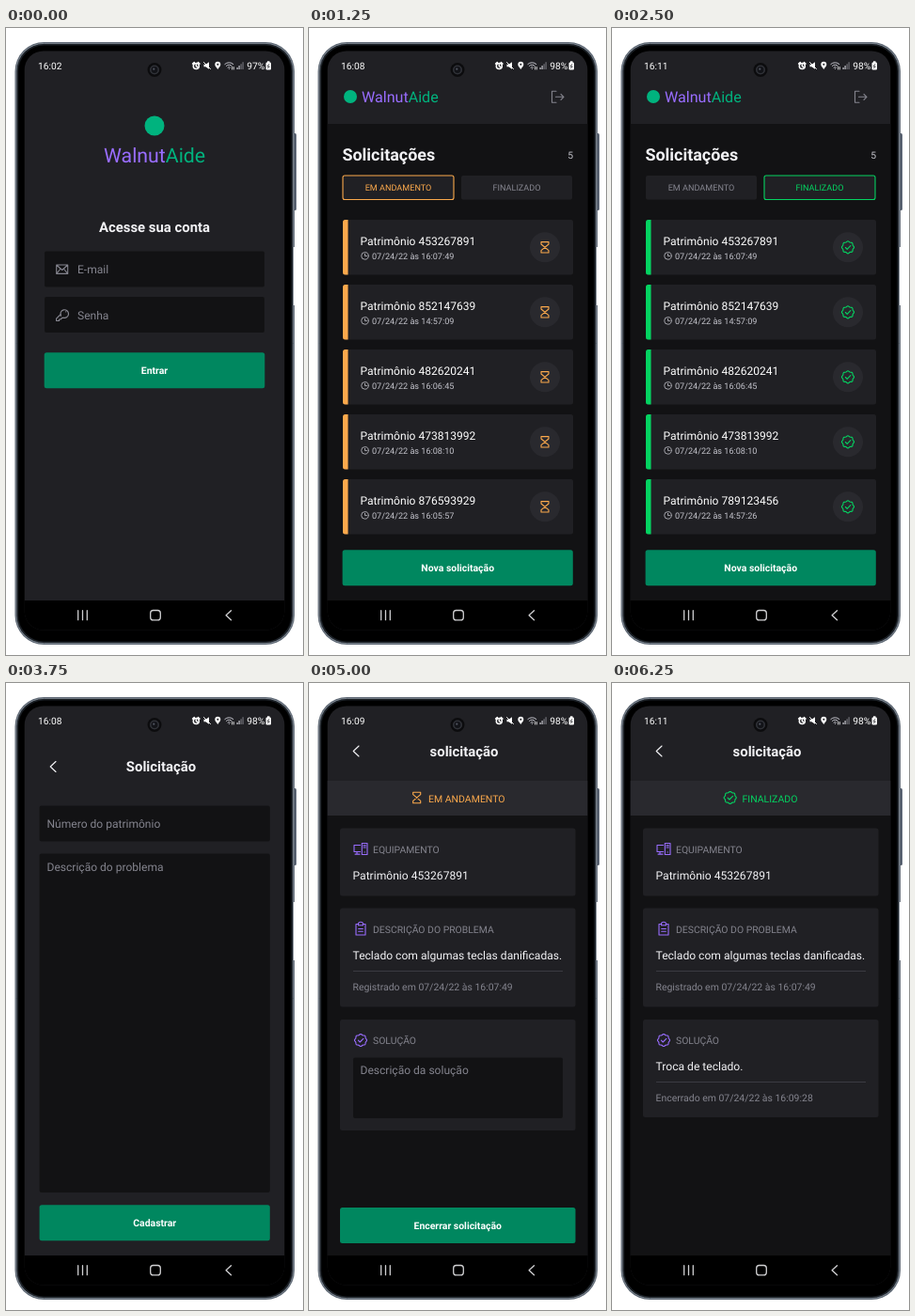
Animation of 316 by 667 pixels, one loop 7.5 s. Source, as an HTML page with a canvas:

```html
<!DOCTYPE html>
<html lang="pt-BR">
<head>
<meta charset="utf-8">
<title>Help desk app</title>
<style>
html, body { margin: 0; width: 100%; height: 100%; overflow: hidden; background: #fff; }
canvas { display: block; width: 316px; height: 667px; }
</style>
</head>
<body>
<canvas id="stage"></canvas>
<script>
const W = 316, H = 667, HOLD = 1250;
const C = {
  dark: '#121214', panel: '#202024', raised: '#29292e', line: '#45454c',
  muted: '#84848e', soft: '#c4c4cc', text: '#f2f2f5', white: '#fff',
  button: '#00875f', teal: '#00b37e', green: '#04d361', orange: '#fba94c', purple: '#996dff'
};
const canvas = document.getElementById('stage');
const ctx = canvas.getContext('2d');
const dpr = window.devicePixelRatio || 1;
canvas.width = W * dpr;
canvas.height = H * dpr;
ctx.textRendering = 'geometricPrecision';

function box(x, y, w, h, fill, r = 0, stroke, lw = 1) {
  ctx.beginPath();
  ctx.roundRect(x, y, w, h, r);
  if (fill) { ctx.fillStyle = fill; ctx.fill(); }
  if (stroke) { ctx.strokeStyle = stroke; ctx.lineWidth = lw; ctx.stroke(); }
}

function dot(x, y, r, fill) {
  ctx.beginPath();
  ctx.arc(x, y, r, 0, Math.PI * 2);
  ctx.fillStyle = fill;
  ctx.fill();
}

function text(str, x, y, size, color = C.white, weight = 400, align = 'left') {
  ctx.font = `${weight} ${size}px Roboto, sans-serif`;
  ctx.textAlign = align;
  ctx.fillStyle = color;
  ctx.fillText(str, x, y);
  return ctx.measureText(str).width;
}

function icon(path, x, y, color, lw = 1, filled = false) {
  ctx.save();
  ctx.translate(x, y);
  ctx.lineWidth = lw;
  ctx.lineCap = ctx.lineJoin = 'round';
  ctx.strokeStyle = ctx.fillStyle = color;
  const p = new Path2D(path);
  if (filled) ctx.fill(p); else ctx.stroke(p);
  ctx.restore();
}

function wavyRing(r) {
  let d = '';
  for (let i = 0; i < 64; i++) {
    const a = i / 64 * Math.PI * 2, k = r + 0.45 * Math.cos(a * 8);
    d += (i ? 'L' : 'M') + (k * Math.cos(a)).toFixed(2) + ' ' + (k * Math.sin(a)).toFixed(2);
  }
  return d + 'Z';
}

const ICON = {
  hourglass: 'M-4-5.7H4V-3.3L-4 3.3V5.7H4V3.3L-4-3.3Z',
  badge: wavyRing(6.1) + 'M-2.6 .2L-.8 2L2.8-1.6',
  back: 'M3-5.5L-2.8 0L3 5.5',
  logout: 'M-1.5-6H-6V6H-1.5M-2 0H6.5M3.5-3L6.5 0L3.5 3',
  mail: 'M-6-4.7H6V4.7H-6ZM-6-4.7L0 .8L6-4.7M-6 4.7L-1.6-.7M6 4.7L1.6-.7',
  key: 'M-1.5 1.2A4.3 4.3 0 1 1 1 3.2L-.6 3.6L-2 5H-3.5V6.5H-6.4V4.2L-1.7-.5M3.6-3.2h.1',
  clock: 'M3.8 0A3.8 3.8 0 1 1-3.8 0A3.8 3.8 0 1 1 3.8 0M0-2.1V.2H2',
  desktop: 'M-.5-4H-7V3H-.5M-4 3V5.6M-6 5.6H-1M1.3-6H7V6H1.3ZM3-3.6H5.3M3-1.5H5.3M4.1 3.4h.1',
  clipboard: 'M-2.3-5H-5V6.5H5V-5H2.3M-2.5-3.8V-5.2A2.5 2 0 0 1 2.5-5.2V-3.8ZM-2.3 0H2.3M-2.3 2.8H2.3'
};

function brand(x, y, size) {
  const w = text('Walnut', x, y, size, C.purple);
  text('Aide', x + w, y, size, C.teal);
}

function button(label, x, y, w) {
  box(x, y, w, 38, C.button, 2.5);
  text(label, x + w / 2, y + 22.8, 10.45, C.white, 700, 'center');
}

function field(label, x, y, w, h, textX, base) {
  box(x, y, w, h, C.dark, 2);
  text(label, textX, base, 12.05, C.muted);
}

function loginScreen() {
  dot(158, 104, 10.5, C.teal);
  brand(104, 143, 21.3);
  text('Acesse sua conta', 158, 217, 14.9, C.text, 700, 'center');
  field('E-mail', 41, 237.5, 234, 38, 76, 261);
  field('Senha', 41, 286, 234, 38, 76, 309.7);
  icon(ICON.mail, 59.7, 256.7, C.muted, 1.1);
  icon(ICON.key, 60, 305, C.muted, 1.2);
  button('Entrar', 40.7, 345.3, 234.6);
}

function tab(label, x, color, active) {
  box(x + .5, 157, 118, 25.5, C.panel, 2, active ? color : null, 1.1);
  text(label, x + 59.5, 173.2, 9.1, active ? color : C.muted, 400, 'center');
}

function orderCard(y, id, time, color, mark) {
  ctx.save();
  ctx.beginPath();
  ctx.roundRect(36, y, 245, 58.5, 2.5);
  ctx.clip();
  box(36, y, 245, 59, C.panel);
  box(36, y, 5.5, 59, color);
  ctx.restore();
  text('Patrimônio ' + id, 54.5, y + 27.2, 12.05);
  icon(ICON.clock, 59.5, y + 38.4, C.soft, .8);
  text('07/24/22 às ' + time, 67, y + 42, 9.1, C.soft);
  dot(251, y + 29.3, 16, C.raised);
  icon(mark, 251, y + 29.3, color, 1.1);
}

function listScreen(done) {
  const color = done ? C.green : C.orange;
  box(18, 102, 280, 507, C.dark);
  dot(44, 73, 7, C.teal);
  brand(56, 78.5, 16.1);
  icon(ICON.logout, 264.5, 73.3, C.muted, 1.1);
  text('Solicitações', 35.5, 141, 17.9, C.text, 700);
  text('5', 281, 139, 10.4, C.soft, 400, 'right');
  tab('EM ANDAMENTO', 35.5, C.orange, !done);
  tab('FINALIZADO', 161.5, C.green, done);
  const last = done ? ['789123456', '14:57:26'] : ['876593929', '16:05:57'];
  const orders = [
    ['453267891', '16:07:49'], ['852147639', '14:57:09'],
    ['482620241', '16:06:45'], ['473813992', '16:08:10'], last
  ];
  orders.forEach(([id, time], i) =>
    orderCard(204 + i * 69, id, time, color, done ? ICON.badge : ICON.hourglass));
  button('Nova solicitação', 35.6, 555.3, 245.2);
}

function formScreen() {
  icon(ICON.back, 50, 89, C.text, 1.1);
  text('Solicitação', 165, 94, 14.9, C.text, 700, 'center');
  field('Número do patrimônio', 35.6, 130.5, 245.2, 38, 43.5, 154.3);
  field('Descrição do problema', 35.6, 181.5, 245.2, 360.5, 43.5, 200);
  button('Cadastrar', 35.6, 555.3, 245.2);
}

function detailCard(y, h, label, mark) {
  box(33, y, 250.5, h, C.panel, 2.5);
  icon(mark, 55, y + 22, C.purple, 1.1);
  text(label, 68, y + 26.3, 10.4, C.muted);
}

function footnote(str, y) {
  box(47, y, 223, .8, C.line);
  text(str, 46.5, y + 20.8, 10.45, C.muted);
}

function detailScreen(done) {
  box(18, 141, 280, 468, C.dark);
  box(18, 104, 280, 37, C.raised);
  icon(ICON.back, 50, 72.5, C.text, 1.1);
  text('solicitação', 165, 77.7, 14.9, C.text, 700, 'center');
  if (done) {
    icon(ICON.badge, 125.7, 122, C.green, 1.1);
    text('FINALIZADO', 138.5, 126.5, 10.5, C.green);
  } else {
    icon(ICON.hourglass, 114.7, 122, C.orange, 1.1);
    text('EM ANDAMENTO', 127, 126.5, 10.5, C.orange);
  }
  detailCard(154.5, 72, 'EQUIPAMENTO', ICON.desktop);
  text('Patrimônio 453267891', 46.5, 209, 12.1, C.text);
  detailCard(239.5, 105, 'DESCRIÇÃO DO PROBLEMA', ICON.clipboard);
  text('Teclado com algumas teclas danificadas.', 46.5, 294, 12.1, C.text);
  footnote('Registrado em 07/24/22 às 16:07:49', 306);
  detailCard(358, done ? 104 : 118, 'SOLUÇÃO', ICON.badge);
  if (done) {
    text('Troca de teclado.', 46.5, 412, 12.1, C.text);
    footnote('Encerrado em 07/24/22 às 16:09:28', 424);
  } else {
    field('Descrição da solução', 47, 398.5, 223, 64.5, 54.5, 416.3);
    button('Encerrar solicitação', 33, 558, 250.5);
  }
}

function statusBar(time, charge) {
  text(time, 34, 43.7, 10.2);
  // alarm, muted speaker, pin
  icon('M3 .4A3 3 0 1 1-3 .4A3 3 0 1 1 3 .4M-3.7-2L-2-3.5M3.7-2L2-3.5M0-1V.6L1.3 1.4', 202.3, 40, C.white, 1.5);
  icon('M-3.5-1.3H-1.5L2-3.8V3.8L-1.5 1.3H-3.5Z', 214, 40, C.white, 1, true);
  icon('M-3.5-3.5L3.5 3.5', 214, 40, C.white, 1);
  icon('M0 4C-1.8 1.6-3 .4-3-1.2A3 3 0 0 1 3-1.2C3 .4 1.8 1.6 0 4Z', 225.3, 40, C.white, 1, true);
  dot(225.3, 38.8, 1, C.panel);
  // wifi and signal
  icon('M-4.5-1.5A6.4 6.4 0 0 1 4.5-1.5M-2.9 .3A4.1 4.1 0 0 1 2.9 .3M-1.3 2A1.9 1.9 0 0 1 1.3 2M0 3.4h.1', 237.3, 40, C.soft, 1);
  icon('M3.3 1.5V4M5 1.5V4', 237.3, 40, C.white, .8);
  for (let i = 0; i < 4; i++)
    box(245.5 + i * 2, 42 - i * 1.9, 1.2, 2 + i * 1.9, i < 2 ? C.soft : '#707078');
  text(charge, 256.2, 43.7, 10.3);
  box(276.5, 36.5, 5.5, 8, C.white, 1.3);
  box(278, 35.3, 2.5, 2, C.white);
  icon('M.6-2L-1.2 .4H1.2L-.6 2.2', 279.2, 40.5, C.panel, .8);
}

function navBar() {
  box(18, 609, 280, 32, '#000');
  const gray = '#d0d0d2';
  icon('M-4.8-5V5M0-5V5M4.8-5V5', 81.5, 624.7, gray, 1.3);
  box(153.7, 619.5, 10.6, 10.4, null, 3, gray, 1.3);
  icon('M2.7-5L-2.7 0L2.7 5', 236.8, 624.7, gray, 1.3);
}

function phoneBody() {
  box(305, 112, 4, 82, '#586170', 1.5);
  box(9.5, 15, 297.5, 641, '#5c6672', 31);
  box(11, 16.4, 294.5, 638.2, '#1b2026', 29.5, '#8b949e', .8);
  box(13.2, 18.4, 290.1, 634.2, '#000', 27.5);
  box(306, 233, 2, 62, '#fff');
}

const SCREENS = [
  { time: '16:02', charge: '97%', draw: loginScreen },
  { time: '16:08', charge: '98%', draw: () => listScreen(false) },
  { time: '16:11', charge: '98%', draw: () => listScreen(true) },
  { time: '16:08', charge: '98%', draw: formScreen },
  { time: '16:09', charge: '98%', draw: () => detailScreen(false) },
  { time: '16:11', charge: '98%', draw: () => detailScreen(true) }
];

function render(screen) {
  ctx.setTransform(dpr, 0, 0, dpr, 0, 0);
  box(0, 0, W, H, '#fff');
  phoneBody();
  ctx.save();
  ctx.beginPath();
  ctx.roundRect(19.7, 24.5, 276.6, 616, 20);
  ctx.clip();
  box(18, 24, 280, 617, C.panel);
  screen.draw();
  navBar();
  ctx.restore();
  statusBar(screen.time, screen.charge);
  dot(158, 44.5, 7.5, '#0c0c0e');
  dot(158, 44.5, 5, '#303238');
  dot(158, 44.5, 3.4, '#121318');
  dot(157.3, 43.7, 1.1, '#50545f');
}

const start = performance.now();
function tick() {
  const step = Math.floor((performance.now() - start) / HOLD) % SCREENS.length;
  render(SCREENS[step]);
  requestAnimationFrame(tick);
}
tick();
</script>
</body>
</html>
```
